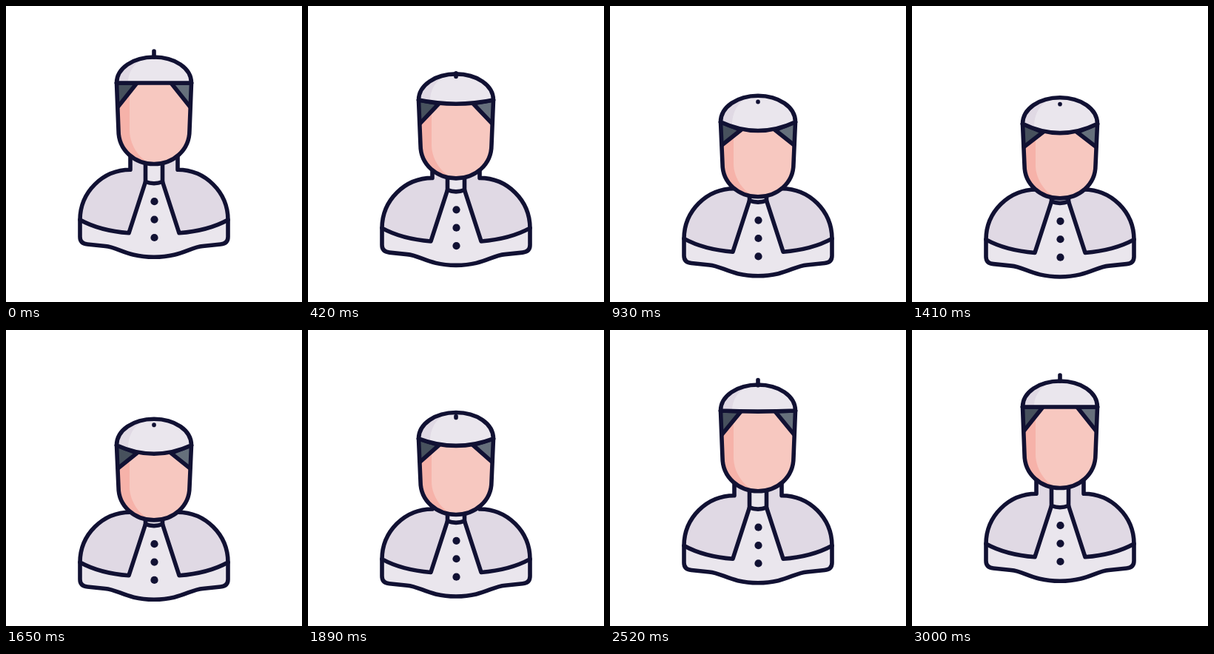
Recreate the animation shown at these times as an HTML page. Size 400x400 px, loop 5030 ms.

```html
<!DOCTYPE html>
<html lang="en">
<head>
<meta charset="utf-8">
<title>Clergyman nodding</title>
<style>
  html, body { margin: 0; width: 100%; height: 100%; overflow: hidden; background: #fff; }
  svg { display: block; width: 100%; height: 100%; }
  .line { fill: none; stroke: #111133; stroke-width: 5.6; stroke-linecap: round; stroke-linejoin: round; }
  .cloth { fill: #eae6ed; }
  .shade { fill: #e0d9e4; }
  .skin { fill: #f7c8c0; }
  .blush { fill: #f6b2a9; }
  .hair-left { fill: #47515d; }
  .hair-right { fill: #66707c; }
  .button { fill: #111133; }
</style>
</head>
<body>
<svg viewBox="0 0 400 400">
  <defs>
    <path id="cape" d="M168 200V221.3A68 68 0 0 0 100 289C120 300 143 305 166 306.8L188.5 237.5V200"/>
  </defs>
  <g id="body">
    <path class="cloth" d="M188 200V237L100 289V312Q100 321 110 322L134 324.5C152 326 164 339.3 200 339.3C236 339.3 248 326 266 324.5L290 322Q300 321 300 312V289L212 237V200Z"/>
    <use href="#cape" class="shade"/>
    <use href="#cape" class="shade" transform="matrix(-1 0 0 1 400 0)"/>
    <g class="line">
      <use href="#cape"/>
      <use href="#cape" transform="matrix(-1 0 0 1 400 0)"/>
      <path d="M188.5 237.5Q200 242 211.5 237.5"/>
      <path d="M100 289V312Q100 321 110 322L134 324.5C152 326 164 339.3 200 339.3C236 339.3 248 326 266 324.5L290 322Q300 321 300 312V289"/>
    </g>
    <g class="button">
      <circle cx="200.5" cy="264.2" r="5.1"/>
      <circle cx="200.5" cy="288.6" r="5.1"/>
      <circle cx="200.5" cy="313" r="5.1"/>
    </g>
  </g>
  <g id="head"></g>
</svg>
<script>
const LOOP = 5030, STEP = 30, DOWN = 1200, UP = 1800;
const body = document.getElementById('body');
const head = document.getElementById('head');

// Cubic easing with control points (x1, 0) and (x2, 1), solved by bisection.
function ease(x, x1, x2) {
  let low = 0, high = 1, s = 0.5;
  for (let i = 0; i < 24; i++) {
    s = (low + high) / 2;
    const r = 1 - s;
    if (3 * s * r * r * x1 + 3 * s * s * r * x2 + s ** 3 < x) low = s;
    else high = s;
  }
  return s * s * (3 - 2 * s);
}

function bowAt(t) {
  if (t < DOWN) return ease(t / DOWN, 0.3, 0.43);
  if (t < DOWN + UP) return 1 - ease((t - DOWN) / UP, 0.62, 0.38);
  return 0;
}

const shape = (name, d) => `<path class="${name}" d="${d}"/>`;

function drawHead(bow) {
  const at = (y, shift) => y + shift * bow;
  const top = at(69, 55.5), edge = at(104, 56), brim = at(104, 68.5);
  const brimControl = 2 * brim - edge;
  const hairTop = at(104, 67.5), hairTip = at(136, 55);
  const jaw = at(168, 48), jawCurve = at(195, 47), chin = at(213.5, 47);
  const stemTop = at(61, 72.5), stemEnd = at(69, 64.5);
  const domeCurve = edge - (edge - top) * 0.57;

  const jawRight = `C226 ${chin} 248 ${jawCurve} 248 ${jaw}L250.5 ${edge}`;
  const face = `M149.5 ${edge}L152 ${jaw}C152 ${jawCurve} 174 ${chin} 200 ${chin}${jawRight}`;
  const litFace = `M167 ${edge}V${jaw}C167 ${at(190, 47)} 184 ${at(212, 47)} 200 ${chin}${jawRight}Z`;
  const domeLeft = `M149.5 ${edge}C149.5 ${domeCurve} 172 ${top} 200 ${top}`;
  const cap = `${domeLeft}C228 ${top} 250.5 ${domeCurve} 250.5 ${edge}Q200 ${brimControl} 149.5 ${edge}Z`;
  const capShade = `${domeLeft}C180 ${top} 165 ${domeCurve} 165 ${at(104, 61)}Z`;
  const hair = x => `M${x(149.5)} ${edge}L${x(177)} ${hairTop}L${x(151.5)} ${hairTip}`;
  const left = hair(x => x), right = hair(x => 400 - x);

  head.innerHTML =
    shape('blush', face + 'Z') +
    shape('skin', litFace) +
    shape('hair-left', left + 'Z') +
    shape('hair-right', right + 'Z') +
    shape('line', left + right) +
    shape('line', face) +
    shape('cloth', cap) +
    shape('shade', capShade) +
    shape('line', cap) +
    shape('line', `M200 ${stemTop}V${stemEnd + 0.01}`);
}

function render(now) {
  const t = Math.floor((now % LOOP) / STEP) * STEP;
  const bow = bowAt(t);
  body.setAttribute('transform', `translate(0 ${27 * bow})`);
  drawHead(bow);
}

const start = performance.now();
function frame() {
  render(performance.now() - start);
  requestAnimationFrame(frame);
}
frame();
</script>
</body>
</html>
```
